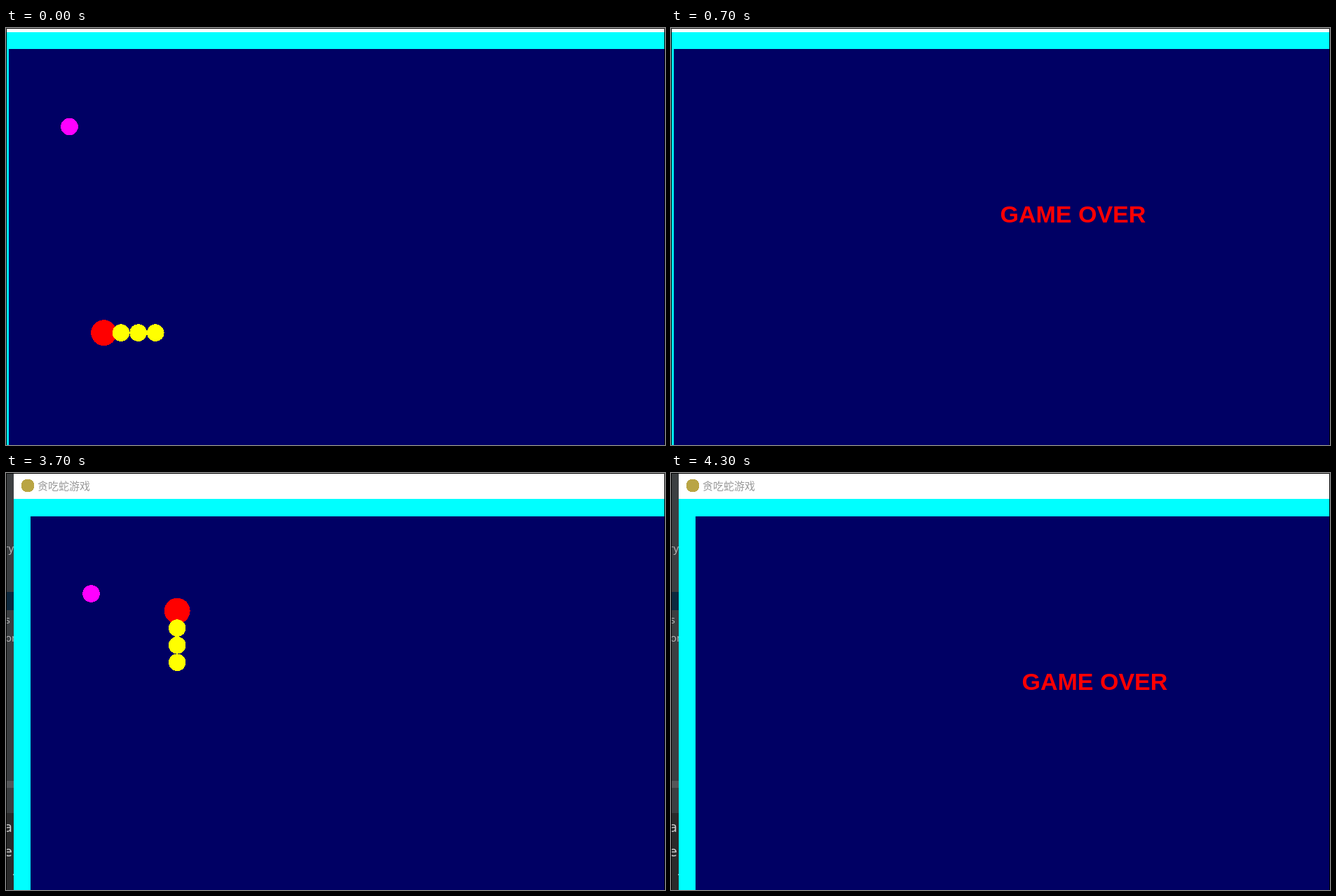
These frames come from a looping animation (940 px wide and 596 px high, 5700 ms). An HTML page:

```html
<!DOCTYPE html>
<html lang="zh">
<head>
<meta charset="utf-8">
<title>贪吃蛇游戏</title>
<style>
  html, body { margin: 0; width: 100%; height: 100%; overflow: hidden; background: #000; }
  svg { display: block; width: 100%; height: 100%; }
  rect, circle { shape-rendering: crispEdges; }
  .title { font: 15px "Noto Sans CJK SC", "Noto Sans CJK", sans-serif; fill: #999; }
  .side { font: 15px "Open Sans", sans-serif; fill: #bbb; }
  .code { font: 20px "Noto Sans Mono", monospace; fill: #ccc; }
  .over { font: bold 34px "Liberation Sans", Arial, sans-serif; font-kerning: none; fill: #f00; }
</style>
</head>
<body>
<svg viewBox="0 0 940 596">
  <g id="view">
    <!-- editor strip behind the game window -->
    <rect width="11" height="596" fill="#3c3f41"/>
    <rect y="170" width="11" height="26" fill="#0d293e"/>
    <rect y="440" width="11" height="10" fill="#555759"/>
    <rect y="486" width="11" height="110" fill="#2b2b2b"/>
    <g text-anchor="end">
      <text class="side" x="11" y="113">ry</text>
      <text class="side" x="6" y="215">s</text>
      <text class="code" x="9" y="513">a</text>
      <text class="code" x="9" y="548">e</text>
    </g>
    <text class="side" x="-1" y="241">on</text>
    <rect x="10" y="573" width="1" height="2" fill="#aaa"/>

    <!-- game window -->
    <rect x="11" y="37.4" width="1000" height="600" fill="#0ff"/>
    <rect x="35" y="61.8" width="1000" height="600" fill="#000064"/>
    <g id="actors"></g>
    <text id="over" class="over" x="500.5" y="309.5">GAME OVER</text>
    <rect x="11" width="1000" height="37.4" fill="#fff"/>
    <circle cx="31" cy="18" r="9.5" fill="#b9a544"/>
    <text class="title" x="45" y="24">贪吃蛇游戏</text>
  </g>
  <path d="M.5 596V.5H939.5V596" fill="none" stroke="#000"/>
</svg>
<script>
const LOOP = 5700, STEP = 100, CELL = 24.55, LEFT = 11, TOP = 37.5;
const view = document.getElementById('view');
const actors = document.getElementById('actors');
const over = document.getElementById('over');

function addDot(radius, color) {
  const dot = document.createElementNS('http://www.w3.org/2000/svg', 'circle');
  dot.setAttribute('r', radius);
  dot.setAttribute('fill', color);
  return actors.appendChild(dot);
}

function place(dot, col, row) {
  dot.setAttribute('cx', LEFT + (col + 0.5) * CELL);
  dot.setAttribute('cy', TOP + (row + 0.5) * CELL);
}

place(addDot(12.3, '#f0f'), 4, 5);
const snake = [addDot(18.4, '#f00')];
while (snake.length < 4) snake.push(addDot(12.3, '#ff0'));

// First game: the snake runs into the left wall.
function runLeft(tick) {
  return { col: 6 - tick, row: 17, dx: 1, dy: 0, over: tick > 6 };
}

// Second game: it runs into the top wall, skipping cells near the end.
function runUp(tick) {
  const row = tick < 9 ? 12 - tick : tick < 11 ? 2 : 0;
  return { col: 9, row, dx: 0, dy: 1, over: tick > 11 };
}

function draw(time) {
  const tick = Math.floor(time % LOOP / STEP);
  const first = tick < 31;
  const game = first ? runLeft(tick) : runUp(tick - 31);
  view.setAttribute('transform', first ? 'translate(-31 -31.5)' : '');
  actors.setAttribute('visibility', game.over ? 'hidden' : 'visible');
  over.setAttribute('visibility', game.over ? 'visible' : 'hidden');
  snake.forEach((dot, i) => place(dot, game.col + i * game.dx, game.row + i * game.dy));
}

const start = performance.now();
function frame() {
  draw(performance.now() - start);
  requestAnimationFrame(frame);
}
frame();
</script>
</body>
</html>
```
